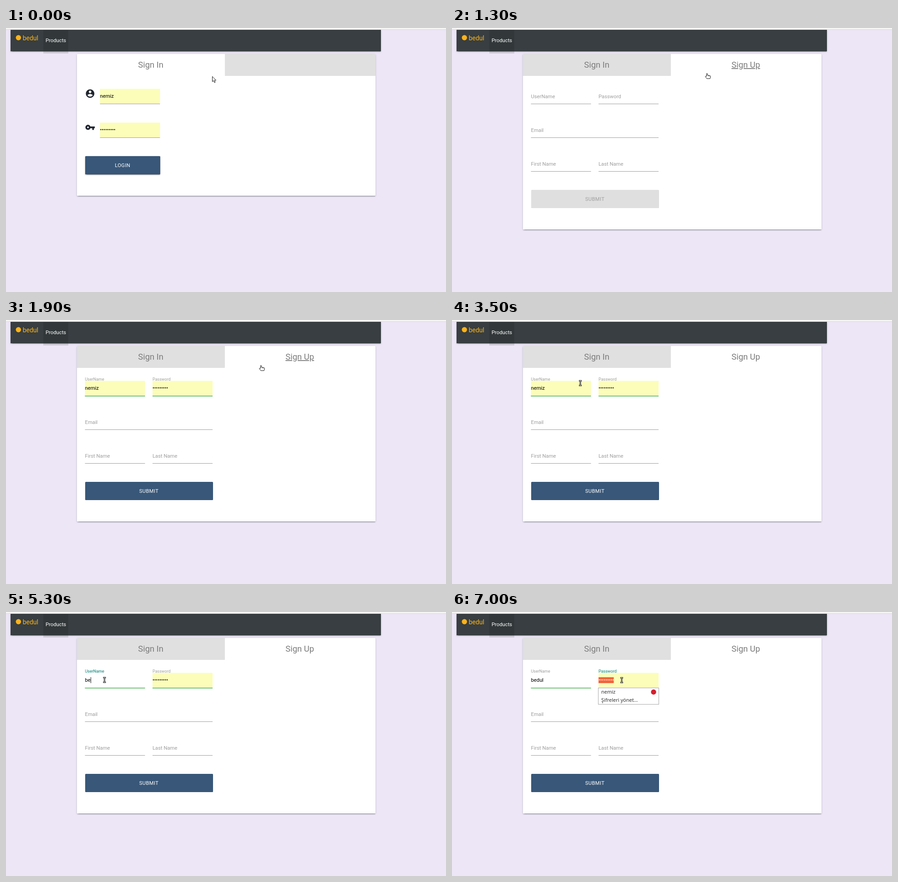
These frames come from a looping animation (967x579 px, 8000 ms). An HTML page:

```html
<!DOCTYPE html>
<html lang="en">
<head>
<meta charset="utf-8">
<title>Sign up form</title>
<style>
html, body { margin: 0; width: 100%; height: 100%; overflow: hidden; background: #ece6f6; }
#stage { position: absolute; left: 0; top: 0; width: 967px; height: 579px; overflow: hidden; }
#stage > * { position: absolute; }
svg { left: 0; top: 0; font: 11.25px Roboto, sans-serif; }

.strip { width: 967px; height: 3px; background: #f6f5f4; border-bottom: 1px solid #d9d5dd; }
.raised { box-shadow: 0 1.5px 1.5px rgba(0,0,0,.16), 0 1px 4px rgba(0,0,0,.14), 0 2px 1px -1.5px rgba(0,0,0,.24); }
.nav { left: 10px; top: 4px; width: 813.5px; height: 46.5px; background: #383e41; }
.active { left: 82px; top: 4px; width: 55px; height: 52px; background: rgba(0,0,0,.1); }
.card { left: 156px; top: 57px; width: 656px; height: 310.5px; border-radius: 1.5px; background: #fff; }
.tab { left: 481px; top: 57px; width: 331px; height: 47.5px; background: #e0e0e0; }
.btn { left: 173.5px; height: 39.5px; border-radius: 1.5px; background: #385779; }
.login { top: 281px; width: 165px; }
.submit { top: 355px; width: 281px; }

.title { font-size: 18.45px; fill: #7c7c7c; text-anchor: middle; }
.caps { fill: #fff; letter-spacing: .375px; text-anchor: middle; }
.hint { fill: #9e9e9e; }
.teal { fill: #26a69a; }
.auto { fill: #fbfdb9; }
.rule { fill: #9e9e9e; }
.green { fill: #4caf50; }
.picked { fill: #f2663a; }
.white { fill: #fff; }
.icon { fill: #20252f; }
.menu { font: 11px "Noto Sans", "Open Sans", sans-serif; fill: #333; }
.caret { fill: #111; }

/* timeline: 1% = 80ms; "on" drives opacity, "off" drives visibility */
.t { animation: 8s step-end infinite; }
.hover { animation-name: hoverOn, leaveOff; }
.plain { animation-name: hoverOff, leaveOn; }
.signin { animation-name: swapOff; }
.signup { animation-name: swapOn; }
.filled { animation-name: fillOn; }
.user { animation-name: fillOn, focusOff; }
.userPick { animation-name: focusOn, typeOff; }
.begun { animation-name: typeOn, doneOff; }
.word { animation-name: doneOn; }
.lastCaret { animation-name: doneOn, blurOff; }
.userBg { animation-name: fillOn, typeOff; }
.userFocus { animation-name: focusOn, passOff; }
.pass { animation-name: passOn; }
.dots { animation-name: fillOn, passOff; }
.card.t { animation-name: grow; }
.tab.t { animation-name: tab; }
.submit.t { animation-name: enable; }
.caps.t { animation-name: enableText; }
.label { animation-name: float; }
.green.t { animation-name: valid; }
.arrow { animation-name: hoverOff, point; }
.hand { animation-name: hoverOn, leaveOff, point; }
.beam { animation-name: leaveOn, read; }

@keyframes hoverOn { 0% { opacity: 0 } 6.25%, to { opacity: 1 } }
@keyframes hoverOff { 0% { visibility: visible } 6.25%, to { visibility: hidden } }
@keyframes swapOn { 0% { opacity: 0 } 16.25%, to { opacity: 1 } }
@keyframes swapOff { 0% { visibility: visible } 16.25%, to { visibility: hidden } }
@keyframes fillOn { 0% { opacity: 0 } 20%, to { opacity: 1 } }
@keyframes leaveOn { 0% { opacity: 0 } 43.75%, to { opacity: 1; visibility: visible } }
@keyframes leaveOff { 0% { visibility: visible } 43.75%, to { visibility: hidden } }
@keyframes focusOn { 0% { opacity: 0 } 53.75%, to { opacity: 1 } }
@keyframes focusOff { 0% { visibility: visible } 53.75%, to { visibility: hidden } }
@keyframes typeOn { 0% { opacity: 0 } 66.25%, to { opacity: 1 } }
@keyframes typeOff { 0% { visibility: visible } 66.25%, to { visibility: hidden } }
@keyframes doneOn { 0% { opacity: 0 } 71.25%, to { opacity: 1 } }
@keyframes doneOff { 0% { visibility: visible } 71.25%, to { visibility: hidden } }
@keyframes blurOff { 0% { visibility: visible } 82.5%, to { visibility: hidden } }
@keyframes passOn { 0% { opacity: 0 } 87.5%, to { opacity: 1 } }
@keyframes passOff { 0% { visibility: visible } 87.5%, to { visibility: hidden } }

@keyframes grow { 16.25%, to { height: 384.5px } }
@keyframes tab { 16.25%, to { left: 156px; width: 324.5px } }
@keyframes enable {
  0% { opacity: 0; background: #dfdfdf; box-shadow: none }
  16.25% { opacity: 1; background: #dfdfdf; box-shadow: none }
  20% { opacity: 1; background: #c2c7cd; box-shadow: none }
  21.25% { opacity: 1; background: #7c8fa6 }
  22.5% { opacity: 1; background: #466284 }
  23.75%, to { opacity: 1; background: #385779 }
}
@keyframes enableText { 0% { fill: #9f9f9f } 20% { fill: #b5b5b5 } 21.25% { fill: #dedede } 22.5%, to { fill: #fff } }
@keyframes float {
  20% { transform: translateY(-7px) scale(.93) }
  21.25% { transform: translateY(-17px) scale(.84) }
  22.5% { transform: translateY(-21px) scale(.81) }
  23.75%, to { transform: translateY(-21.5px) scale(.8) }
}
@keyframes valid { 0% { opacity: 0 } 20% { opacity: .3 } 21.25% { opacity: .8 } 22.5%, to { opacity: 1 } }
@keyframes point {
  0% { transform: translate(453px, 105.5px) }
  5% { transform: translate(468px, 105px) }
  6.25% { transform: translate(504px, 104px) }
  7.5% { transform: translate(543px, 102px) }
  8.75% { transform: translate(555.5px, 99.5px) }
  11.25%, to { transform: translate(556px, 99px) }
}
@keyframes read {
  0% { transform: translate(282px, 138.5px) }
  48.75% { transform: translate(216.5px, 149px) }
  82.5%, to { transform: translate(373px, 149.5px) }
}
</style>
</head>
<body>
<div id="stage">
  <div class="strip"></div>
  <div class="nav raised"></div>
  <div class="active"></div>
  <div class="card raised t"></div>
  <div class="tab t"></div>
  <div class="btn login raised t signin"></div>
  <div class="btn submit raised t"></div>

  <svg width="967" height="579" viewBox="0 0 967 579">
    <defs>
      <g id="menu">
        <rect x="-.5" y="166.5" width="133" height="36" fill="#fff" stroke="#a9a9a9"/>
        <g class="menu">
          <text x="6" y="179">nemiz</text>
          <text x="6" y="197">Şifreleri yönet…</text>
        </g>
        <circle cx="121" cy="175.5" r="5.7" fill="#d3202f"/>
      </g>
    </defs>

    <circle cx="27.3" cy="21.3" r="5.7" fill="#fbb31a"/>
    <text x="36.7" y="26.5" font-size="14" fill="#fbb31a">bedul</text>
    <text x="87" y="31" fill="#fff">Products</text>

    <text class="title" x="318.2" y="87">Sign In</text>
    <text class="title t plain" x="645.7" y="87">Sign Up</text>
    <text class="title t hover" x="645.7" y="87" text-decoration="underline">Sign Up</text>

    <g class="t signin">
      <g class="icon">
        <path transform="translate(173.6 132.6) scale(.9375)" d="M12 2C6.48 2 2 6.48 2 12s4.48 10 10 10 10-4.48 10-10S17.52 2 12 2zm0 3c1.66 0 3 1.34 3 3s-1.34 3-3 3-3-1.34-3-3 1.34-3 3-3zm0 14.2c-2.5 0-4.71-1.28-6-3.22.03-1.99 4-3.08 6-3.08 1.99 0 5.97 1.09 6 3.08-1.29 1.94-3.5 3.22-6 3.22z"/>
        <path transform="translate(173.6 206.6) scale(.9375)" d="M12.65 10C11.83 7.67 9.61 6 7 6c-3.31 0-6 2.69-6 6s2.69 6 6 6c2.61 0 4.83-1.67 5.65-4H17v4h4v-4h2v-4H12.65zM7 14c-1.1 0-2-.9-2-2s.9-2 2-2 2 .9 2 2-.9 2-2 2z"/>
      </g>
      <path class="auto" d="M206.5 133.5h132v33h-132zM206.5 207.5h132v33h-132z"/>
      <path class="rule" d="M206.5 166h132v1h-132zM206.5 240h132v1h-132z"/>
      <text x="206.5" y="153">nemiz</text>
      <text x="206.5" y="226.5">•••••••••</text>
      <text class="caps" x="256.2" y="304.7">LOGIN</text>
    </g>

    <g class="t signup">
      <path class="rule" d="M173.5 166h132v1h-132zM322 166h132v1h-132zM173.5 240h280.5v1h-280.5zM173.5 314h132v1h-132zM322 314h132v1h-132z"/>
      <g class="hint">
        <text x="173.5" y="228">Email</text>
        <text x="173.5" y="302">First Name</text>
        <text x="322" y="302">Last Name</text>
      </g>
      <text class="caps t" x="314" y="378.7">SUBMIT</text>

      <rect class="auto t userBg" x="173.5" y="133.5" width="132" height="33"/>
      <rect class="auto t filled" x="322" y="133.5" width="132" height="33"/>
      <path class="green t" d="M173.5 166h132v1.6h-132zM322 166h132v1.6h-132z"/>

      <g transform="translate(173.5 154)">
        <text class="hint t label">UserName</text>
      </g>
      <g transform="translate(322 154)">
        <text class="hint t label">Password</text>
      </g>
      <g class="t userFocus" font-size="9">
        <text class="teal" x="173.5" y="132.5">UserName</text>
      </g>
      <g class="t pass" font-size="9">
        <text class="teal" x="322" y="132.5">Password</text>
      </g>

      <text class="t user" x="173.5" y="153">nemiz</text>
      <g class="t userPick">
        <rect class="picked" x="173.5" y="143" width="28.5" height="13"/>
        <text class="white" x="173.5" y="153">nemiz</text>
        <use href="#menu" x="173.5"/>
      </g>
      <g class="t begun">
        <text x="173.5" y="153">be</text>
        <rect class="caret" x="186" y="143" width="1" height="13"/>
      </g>
      <text class="t word" x="173.5" y="153">bedul</text>
      <rect class="caret t lastCaret" x="201" y="143" width="1" height="13"/>

      <text class="t dots" x="322" y="153">•••••••••</text>
      <g class="t pass">
        <rect class="picked" x="322" y="143" width="33.5" height="13"/>
        <text class="white" x="322" y="153">•••••••••</text>
        <use href="#menu" x="322"/>
      </g>
    </g>

    <g class="t arrow">
      <path d="M.5 .8V12.2L3.1 9.8 5 14.2 7 13.3 5.1 9.1H8.6Z" fill="#fff" stroke="#111"/>
    </g>
    <g class="t hand">
      <path d="M3.4 7V1.5Q3.4 .5 4.4 .5T5.4 1.5V4.6L10.4 5.3Q12 5.6 12 7V9.2L11 12H4.2L1 8.2Q.4 7 1.6 6.6Z" fill="#fff" stroke="#111" stroke-linejoin="round"/>
      <path d="M7.4 5.2V7M9.6 5.5V7.2" stroke="#111" stroke-width=".7"/>
    </g>
    <g class="t beam" fill="none">
      <path d="M-3-5.2H3M-3 5.2H3M0-5.2V5.2" stroke="#111" stroke-width="2.8"/>
      <path d="M-2.2-5.2H2.2M-2.2 5.2H2.2M0-5.2V5.2" stroke="#fff" stroke-width=".8"/>
    </g>
  </svg>
</div>
</body>
</html>
```
